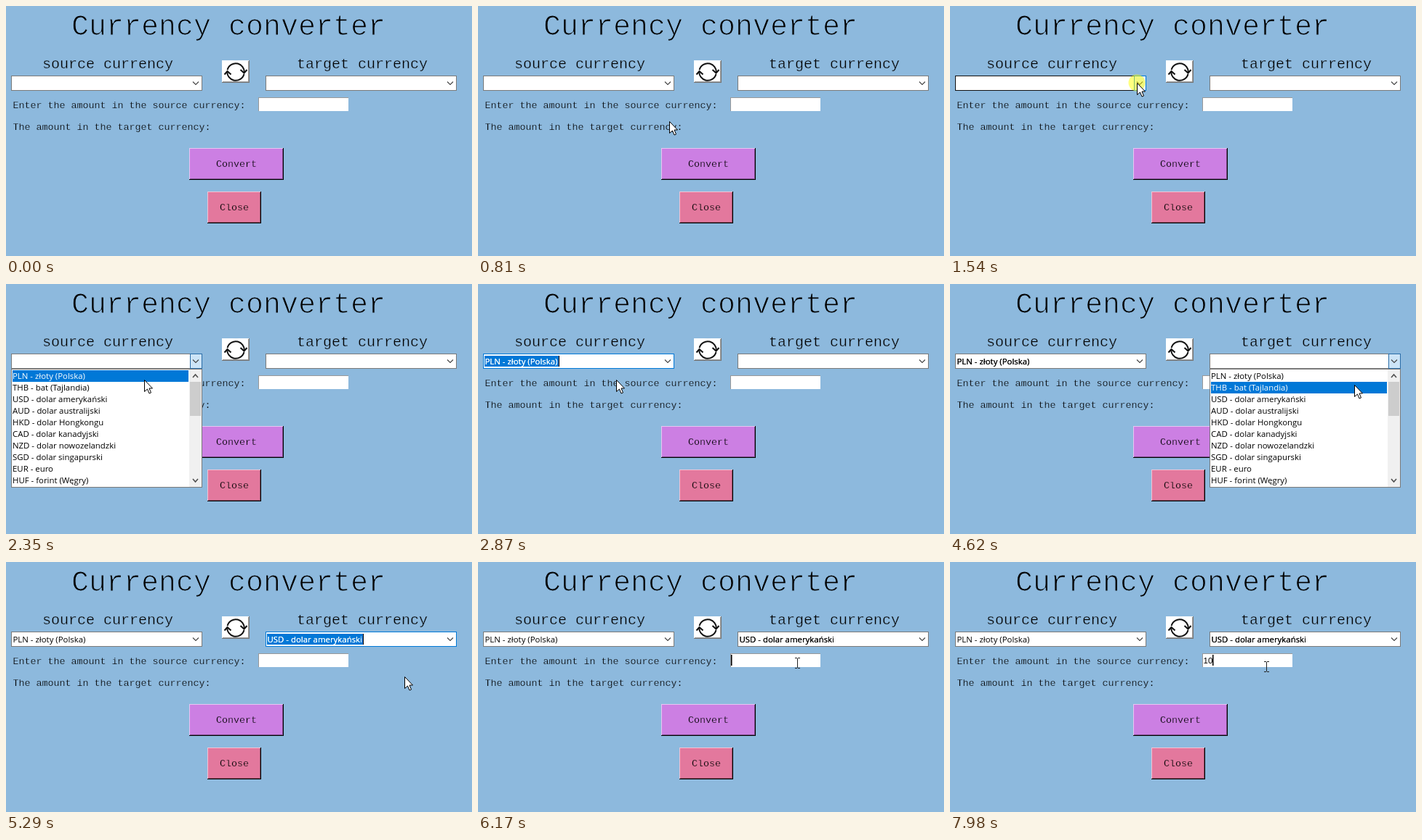
Recreate the animation shown at these times as an HTML page with a canvas. Size 641 by 345 pixels, loop 8 s.

```html
<!DOCTYPE html>
<html lang="en">
<head>
<meta charset="utf-8">
<title>Currency converter</title>
<style>
html, body { margin: 0; width: 100%; height: 100%; overflow: hidden; background: #8db9dd; }
canvas { display: block; }
</style>
</head>
<body>
<canvas id="stage" width="641" height="345"></canvas>
<script>
const g = document.getElementById('stage').getContext('2d');
const BG = '#8db9dd', BLUE = '#0078d7', GRAY = '#7a7a7a', VIOLET = '#cc7fe3', PINK = '#e3789d';
const MONO = '"Liberation Mono", "Courier New", monospace';
const UI = '11.4px "Open Sans", "Noto Sans", sans-serif';
const ENTRY = '11.5px "Liberation Sans", Arial, sans-serif';
const CURRENCIES = ['PLN - złoty (Polska)', 'THB - bat (Tajlandia)', 'USD - dolar amerykański',
  'AUD - dolar australijski', 'HKD - dolar Hongkongu', 'CAD - dolar kanadyjski',
  'NZD - dolar nowozelandzki', 'SGD - dolar singapurski', 'EUR - euro', 'HUF - forint (Węgry)'];

// Pointer moves: start, end, steps, then a quadratic curve from a through b to c
const MOVES = [
  [330, 470, 3, [413, 271], [338, 218], [263, 166]],
  [740, 1270, 9, [263, 166], [265, 138], [257, 106]],
  [1940, 2350, 7, [257, 106], [222, 124], [190, 132]],
  [3140, 3830, 11, [190, 132], [400, 150], [608, 108]],
  [4430, 4890, 8, [608, 108], [534, 145], [548, 158]],
  [5550, 5960, 7, [548, 158], [490, 66], [439, 139]],
  [7980, 8000, 1, [439, 139], [437, 141], [435, 144]]
];
const CLICKS = [[1540, 1670], [2740, 2870], [4040, 4100], [5220, 5290], [6100, 6170]];
const CARET = [[6100, 6700], [6980, 7580], [7910, 8000]];

const within = (t, spans) => spans.some(([a, b]) => t >= a && t < b);

function rect(x, y, w, h, fill, border) {
  if (border) {
    g.fillStyle = border;
    g.fillRect(x, y, w, h);
    x++; y++; w -= 2; h -= 2;
  }
  g.fillStyle = fill;
  g.fillRect(x, y, w, h);
}

function text(str, x, y, font, color = '#000') {
  g.font = font;
  g.fillStyle = color;
  g.fillText(str, x, y);
}

// Monospace text; "thin" trims the outline in the background colour for lighter strokes
function mono(str, x, y, size, thin, back = BG) {
  text(str, x, y, `${size}px ${MONO}`);
  g.strokeStyle = back;
  g.lineWidth = thin;
  g.strokeText(str, x, y);
}

const label = (str, x, y, back) => mono(str, x, y, 13.333, .25, back);

function line(points, color, width) {
  g.beginPath();
  points.forEach(([x, y]) => g.lineTo(x, y));
  g.strokeStyle = color;
  g.lineWidth = width;
  g.stroke();
}

function raised(x, y, w, h, fill, edge = '#000') {
  rect(x, y, w, h, edge);
  rect(x, y, w - 1, h - 1, fill);
  rect(x, y, w - 1, h - 1, 'rgba(255,255,255,.55)');
  rect(x + 1, y + 1, w - 2, h - 2, fill);
  rect(x + 1, y + 1, w - 2, h - 2, 'rgba(0,0,0,.4)');
  rect(x + 1, y + 1, w - 3, h - 3, fill);
}

function swapIcon() {
  raised(297, 75, 38, 31, '#fff', '#777');
  g.strokeStyle = '#111';
  g.lineWidth = 2;
  for (const start of [Math.PI * 1.08, Math.PI * 0.08]) {
    g.beginPath();
    g.arc(316, 91, 11.8, start, start + Math.PI * 0.92);
    g.stroke();
  }
  line([[300.5, 94.5], [304.5, 90], [309.5, 94.5]], '#111', 2);
  line([[322.5, 88], [327.5, 92.5], [331.5, 88]], '#111', 2);
}

function combo(x, value, { hover, open, selected, heavy }) {
  const border = selected ? BLUE : hover && !open ? '#111' : GRAY;
  rect(x, 96, 263, 21, '#fff', border);
  if (open) rect(x + 246, 96, 17, 21, '#cce4f7', '#2a6da8');
  else if (hover) rect(x + 246, 96, 17, 21, '#e5f1fb', BLUE);
  line([[x + 250, 104.5], [x + 254, 108.5], [x + 258, 104.5]], '#444', 1.1);
  if (!value) return;
  g.font = UI;
  if (selected) {
    const w = g.measureText(value).width + 2;
    rect(x + 2, 99, w, 15, BLUE);
    rect(Math.round(x + 2 + w), 99, 1, 15, '#000');
  }
  for (let i = heavy || selected ? 2 : 1; i--;) text(value, x + 2.5, 111, UI, selected ? '#fff' : '#000');
}

function list(x, active) {
  rect(x, 117, 263, 164, '#fff', GRAY);
  CURRENCIES.forEach((name, i) => {
    const y = 119 + 16 * i;
    if (i === active) rect(x + 2, y, 242, 16, BLUE);
    text(name, x + 2, y + 12, UI, i === active ? '#fff' : '#000');
  });
  rect(x + 245, 118, 17, 162, '#f0f0f0');
  rect(x + 246, 135, 15, 47, '#cdcdcd');
  for (const [y, d] of [[127, -2], [271, 2]])
    line([[x + 250, y - d], [x + 253.5, y + d], [x + 257, y - d]], '#505050', 1.6);
}

function pointer(t) {
  const move = MOVES.filter(m => t >= m[0]).pop();
  if (!move) return null;
  const [from, to, steps, a, b, c] = move;
  const gap = (to - from) / (steps - 1 || 1);
  const p = Math.min(steps, Math.floor((t - from) / gap + 1.2)) / steps;
  const e = p * p * (3 - 2 * p), r = 1 - e;
  return a.map((v, i) => Math.round(r * r * v + 2 * r * e * b[i] + e * e * c[i]));
}

function arrow(x, y) {
  g.beginPath();
  [[0, 0], [0, 16], [4, 12.5], [6.5, 18.5], [9, 17.5], [6.5, 11.5], [11, 11.5]]
    .forEach(([dx, dy]) => g.lineTo(x + dx + .5, y + dy + .5));
  g.closePath();
  g.fillStyle = '#fff';
  g.fill();
  g.strokeStyle = '#000';
  g.lineWidth = 1;
  g.stroke();
}

function beam(x, y) {
  rect(x, y - 6, 1, 13, '#222');
  for (const dy of [-7, 7]) {
    rect(x - 3, y + dy, 3, 1, '#222');
    rect(x + 1, y + dy, 3, 1, '#222');
  }
}

function draw(t) {
  const pos = pointer(t);
  const [px, py] = pos || [-99, -99];
  const over = (x, y, w, h) => px >= x && px < x + w && py >= y && py < y + h;
  const openLeft = t >= 1610 && t < 2870, openRight = t >= 4100 && t < 5290;

  rect(0, 0, 641, 345, BG);
  mono('Currency converter', 90, 40, 40, 1.2);
  mono('source currency', 50, 86, 20, .4);
  mono('target currency', 400, 86, 20, .4);
  label('Enter the amount in the source currency:', 9.5, 141);
  label('The amount in the target currency:', 9.5, 171);
  swapIcon();

  rect(347, 126, 124, 19, '#999');
  rect(348, 127, 123, 18, '#fff');
  const typed = t >= 7450 ? '10' : t >= 7120 ? '1' : '';
  text(typed, 348.5, 140, ENTRY);
  if (within(t, CARET)) rect(348 + 6 * typed.length + (typed ? 1 : 0), 128, 1.5, 15, '#000');

  raised(252, 196, 130, 44, VIOLET);
  label('Convert', 289, 222, VIOLET);
  raised(277, 256, 74, 44, PINK);
  label('Close', 294, 282, PINK);

  combo(7, t >= 2870 && CURRENCIES[0], {
    hover: over(7, 96, 263, 21), open: openLeft,
    selected: t >= 2870 && t < 4040, heavy: t >= 4040 && t < 5220
  });
  combo(357, t >= 5290 && CURRENCIES[2], {
    hover: over(357, 96, 263, 21) && t < 5290, open: openRight,
    selected: t >= 5290 && t < 6100, heavy: t >= 6100
  });
  const row = Math.max(0, Math.floor((py - 119) / 16));
  if (openLeft) list(7, row);
  if (openRight) list(357, row);

  if (!pos) return;
  if (within(t, CLICKS)) {
    g.fillStyle = 'rgba(255,255,0,.5)';
    g.beginPath();
    g.arc(px, py, 11.5, 0, 7);
    g.fill();
  }
  const inField = over(7, 96, 246, 21) || over(357, 96, 246, 21) || over(347, 126, 124, 19);
  (inField && !openLeft && !openRight ? beam : arrow)(px, py);
}

const start = performance.now();
function tick() {
  draw((performance.now() - start) % 8000);
  requestAnimationFrame(tick);
}
tick();
</script>
</body>
</html>
```
